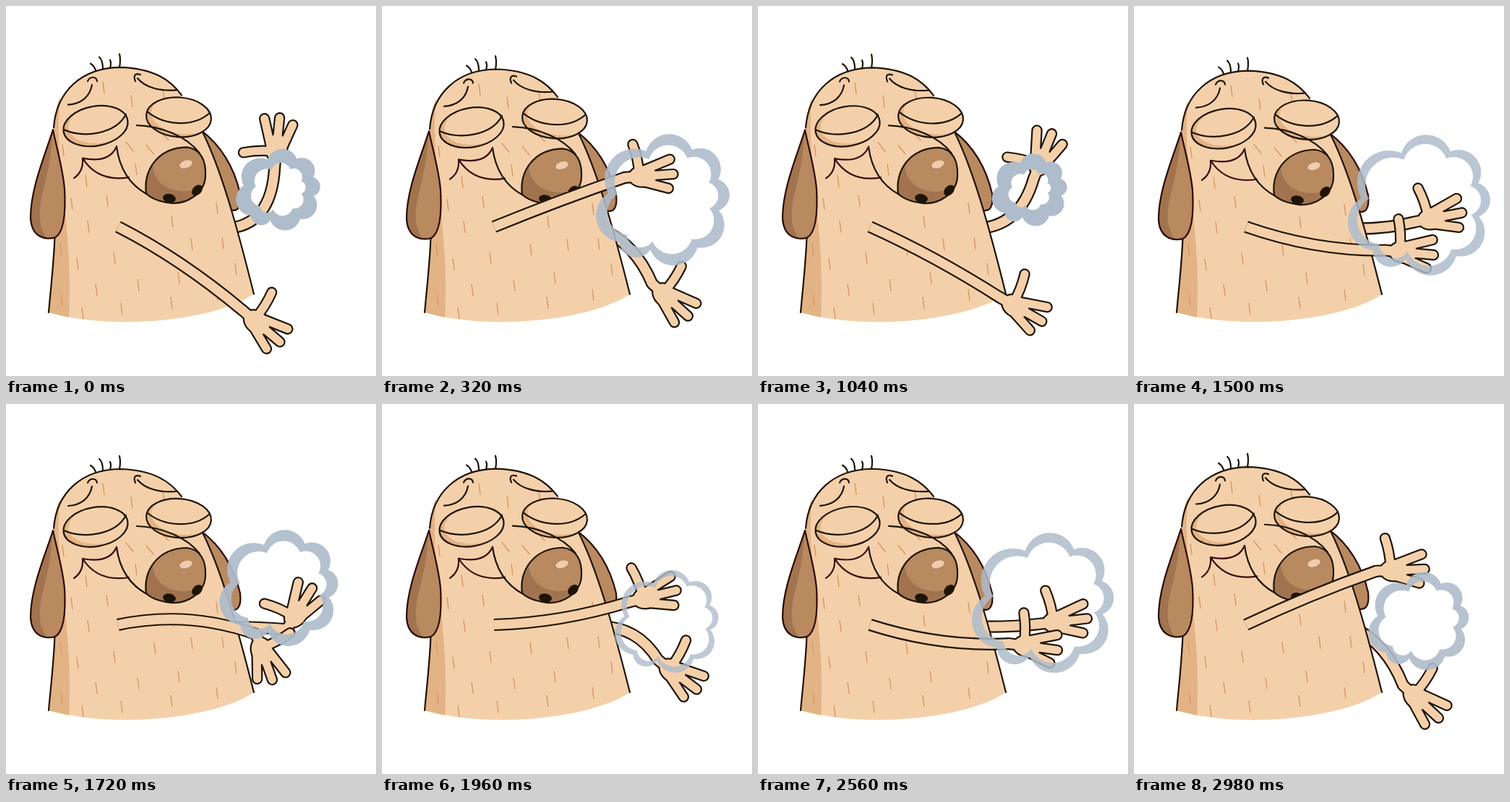
An HTML page with a canvas that plays this animation: 512x512 px, repeating every 3000 ms.

```html
<!DOCTYPE html>
<html lang="en">
<head>
<meta charset="utf-8">
<title>Clapping dog</title>
<style>
  html, body { margin: 0; width: 100%; height: 100%; overflow: hidden; background: #fff; }
  canvas { display: block; width: 512px; height: 512px; }
</style>
</head>
<body>
<canvas id="stage" width="512" height="512"></canvas>
<script>
const ctx = document.getElementById('stage').getContext('2d');
const LOOP = 3000, SWING = 1600 / 3, CYCLE = SWING * 2;
const INK = '#1e1405', SKIN = '#f4d0aa', SHADE = '#e2b384', FUR = '#b9895f',
  FUR_DARK = '#a1744f', MOUTH = '#3a0d10', FRECKLE = '#d79a68', PUFF = '#aebccb';
const RAD = Math.PI / 180;

// Front arm: time, wrist x, wrist y, bend, hand angle
const FRONT = [
  [0, 328, 421, -14, 40], [20, 326, 432, -16, 46], [45, 330, 422, -24, 62],
  [107, 346, 330, -28, 75], [190, 346, 262, -22, 48], [280, 328, 192, -14, 14],
  [313, 335, 230, -6, -2], [360, 342, 273, 13, -14], [427, 348, 331, 18, 8],
  [433, 348, 337, 18, 5], [506, 335, 402, -8, 29], [SWING, 328, 421, -14, 40]
];
// Back arm: time, wrist x, wrist y, control x, control y, hand angle
const BACK = [
  [0, 372, 222, 368, 306, -84], [20, 367, 208, 370, 306, -86], [45, 373, 238, 366, 306, -80],
  [107, 388, 303, 355, 309, -67], [190, 390, 355, 352, 310, -15], [280, 362, 412, 348, 338, 52],
  [313, 372, 390, 350, 333, 43], [360, 382, 355, 354, 308, 38], [427, 389, 305, 350, 309, -6],
  [433, 388, 300, 350, 309, -10], [506, 382, 240, 362, 306, -67], [SWING, 372, 222, 368, 306, -84]
];
// Puffs: time, centre x, centre y, radius x, radius y, hole ratio, opacity
const PUFFS = [
  [[-90, 376, 254, 18, 16, 0, 1], [-27, 376, 253.5, 53.5, 49.5, .56, 1], [0, 377, 253, 60, 56, .65, 1],
   [107, 378, 252.5, 83, 79, .77, .95], [430, 395, 273.5, 101, 97.5, .86, .85], [510, 400, 276, 105, 102, 1, .7]],
  [[443, 376, 254, 18, 16, 0, 1], [533, 377, 253, 60, 56, .65, 1],
   [640, 378, 252.5, 83, 79, .77, .95], [735, 379, 256, 93, 89, 1, .8]],
  [[735, 392, 296, 25, 22, 0, 1], [847, 394.5, 299, 71.5, 68, .8, .9],
   [893, 394.5, 299.5, 73.5, 71.5, .88, .8], [945, 395, 300, 77, 74, 1, .7]]
];
const NOTCHES = [[-.25, -.72], [.42, -.74], [.8, -.29], [.81, .18], [.5, .74], [-.19, .78], [-.64, .66], [-.8, -.08]];
const FRECKLES = [
  [135, 118], [174, 136], [218, 128], [79, 203], [91, 276], [111, 245], [140, 272], [114, 307],
  [99, 358], [125, 393], [106, 425], [76, 338], [77, 407], [160, 419], [150, 350], [183, 387],
  [206, 338], [239, 377], [229, 411], [230, 300], [257, 331], [292, 400], [300, 330], [318, 365],
  [292, 282], [180, 229], [171, 198, 5], [199, 202, 5], [219, 183, 6]
];

const SHAPES = {
  body: 'M59 424 L67 322 L66 172 C70 122 105 91 157 90 C205 91 228 108 243 128 L274 180 C297 228 318 300 343 399 C290 435 150 450 59 424Z',
  shade: 'M59 424 L67 322 L66 172 C67 155 70 142 75 130 C68 190 80 250 83 300 C88 350 89 390 87 431Z',
  outline: 'M59 424 C62 390 66 360 67.500 320 M66 172 C70 122 105 91 157 90 C205 91 228 108 243 128 M272 178 C297 228 318 300 343 399',
  ear: 'M65 175 C54 210 34 255 34 295 C35 320 52 326 68 322 C80 315 83 290 81 255 C78 225 70 200 65 175Z',
  earShade: 'M64 178 C54 210 34 255 34 295 C35 318 46 323 57 323 C38 300 50 265 56 240 C61 215 64 195 64 178Z',
  farEar: 'M270 176 C298 197 316 228 324 262 C326 280 321 288 309 284Z',
  nose: 'M194 262 C190 232 208 200 250 199 C270 201 277 218 276 238 C275 262 250 277 228 275 C212 273 200 268 194 262Z',
  noseShade: 'M194 262 C192 245 196 232 203 222 C204 252 235 268 272 254 C262 270 245 276 228 275 C212 273 200 268 194 262Z',
  muzzle: 'M181 169 C215 170 250 184 268 207 M153 198 C157 228 171 250 195 263',
  mouth: 'M94 241 C103 235 107 226 106 214 Q143 221 153 198 M106 214 Q127 247 170 240',
  brows: 'M86 141 C104 140 116 130 119 114 M113 109 C116 102 125 102 126 109 M179 109 C175 99 181 98 186 100 M182 105 C192 117 212 123 236 121',
  hair: 'M124 94 Q122 88 117 85 M134 92 Q134 80 129 76 M144 91 Q146 84 144 80 M157 90 Q159 80 157 72',
  lids: 'M80 175 C108 187 152 181 166 154 M196 151 C220 170 260 172 282 152'
};
for (const name in SHAPES) SHAPES[name] = new Path2D(SHAPES[name]);

function fill(path, color) { ctx.fillStyle = color; ctx.fill(path); }

function stroke(path, color = INK, width = 2.2) {
  ctx.strokeStyle = color;
  ctx.lineWidth = width;
  ctx.stroke(path);
}

function oval(x, y, rx, ry, turn = 0) {
  const path = new Path2D();
  path.ellipse(x, y, rx, ry, turn * RAD, 0, 2 * Math.PI);
  return path;
}

function pose(keys, t) {
  let i = 1;
  while (i < keys.length - 1 && keys[i][0] < t) i++;
  const a = keys[i - 1], b = keys[i], u = (t - a[0]) / (b[0] - a[0]);
  return a.map((v, k) => v + (b[k] - v) * u).slice(1);
}

function eye(x, y, turn) {
  const lid = oval(x, y, 45, 27, turn);
  fill(lid, SHADE);
  ctx.save();
  ctx.clip(lid);
  fill(oval(x + 8, y - 4, 46, 27, turn), SKIN);
  ctx.restore();
  stroke(lid);
}

function drawDog() {
  fill(SHAPES.body, SKIN);
  fill(SHAPES.shade, SHADE);
  const spots = new Path2D();
  for (const [x, y, lean = 1] of FRECKLES) {
    const h = lean > 1 ? 6 : 7.5;
    spots.moveTo(x - lean, y - h);
    spots.lineTo(x + lean, y + h);
  }
  stroke(spots, FRECKLE, 1.5);
  stroke(SHAPES.outline);
  stroke(SHAPES.hair);

  fill(SHAPES.ear, FUR);
  fill(SHAPES.earShade, FUR_DARK);
  stroke(SHAPES.ear, '#2b0a05');

  stroke(SHAPES.brows);
  eye(124, 170, -10);
  eye(239, 158, 4);
  stroke(SHAPES.lids);
  stroke(SHAPES.mouth, MOUTH);
  stroke(SHAPES.muzzle);

  fill(SHAPES.nose, FUR);
  fill(SHAPES.noseShade, FUR_DARK);
  fill(oval(249, 222, 9, 5, -18), '#efccae');
  fill(oval(226, 268.5, 9, 6, 10), INK);
  fill(oval(264.5, 257.5, 8.5, 6, -45), INK);
  stroke(SHAPES.nose);
}

// Ink pass first, then a narrower skin pass, so the parts share one outline.
function drawArm(x0, y0, cx, cy, x, y, angle) {
  const arm = new Path2D(`M${x0} ${y0} Q${cx} ${cy} ${x} ${y}`);
  const wrist = new Path2D(`M${x} ${y} l${10 * Math.cos(angle * RAD)} ${10 * Math.sin(angle * RAD)}`);
  const digits = new Path2D('M20 -4 Q20 -25 14 -45');
  for (const a of [-18, 0, 18]) {
    const c = Math.cos(a * RAD), s = Math.sin(a * RAD), len = a > 0 ? 62 : 67;
    digits.moveTo(26, s * 26);
    digits.lineTo(c * len, s * len);
  }
  const palm = oval(25, 0, 19, 14);
  for (const [color, grow] of [[INK, 4.4], [SKIN, 0]]) {
    ctx.lineCap = 'butt';
    stroke(arm, color, 12.8 + grow);
    ctx.lineCap = 'round';
    stroke(wrist, color, 12.8 + grow);
    ctx.save();
    ctx.translate(x, y);
    ctx.rotate(angle * RAD);
    stroke(digits, color, 11 + grow);
    fill(palm, color);
    if (grow) stroke(palm, color, grow);
    ctx.restore();
  }
}

function puffOutline(x, y, rx, ry) {
  const pts = NOTCHES.map(([u, v]) => [x + u * rx, y + v * ry]);
  let d = 'M' + pts[0];
  pts.forEach((p, i) => {
    const q = pts[(i + 1) % pts.length];
    const r = .53 * Math.hypot(q[0] - p[0], q[1] - p[1]);
    d += `A${r} ${r} 0 0 1 ${q}`;
  });
  return d + 'Z';
}

function drawPuff(keys, t) {
  const end = keys[keys.length - 1][0];
  if (t - CYCLE >= keys[0][0]) t -= CYCLE;
  if (t < keys[0][0] || t >= end) return;
  const [x, y, rx, ry, hole, alpha] = pose(keys, t);
  let d = puffOutline(x, y, rx, ry);
  if (hole > .02) d += puffOutline(x, y, rx * hole, ry * hole);
  ctx.globalAlpha = alpha;
  ctx.fillStyle = PUFF;
  ctx.fill(new Path2D(d), 'evenodd');
  ctx.globalAlpha = 1;
}

// The body stretches from its base at both ends of each swing.
function stretched(amount, draw) {
  ctx.save();
  ctx.translate(0, 425);
  ctx.scale(1, 1 + .0156 * amount);
  ctx.translate(0, -425);
  draw();
  ctx.restore();
}

function render(t) {
  const swing = t % SWING;
  const bob = Math.pow((1 + Math.cos((swing + 3) / SWING * 4 * Math.PI)) / 2, 1.5);
  ctx.fillStyle = '#fff';
  ctx.fillRect(0, 0, 512, 512);
  ctx.lineCap = ctx.lineJoin = 'round';

  stretched(bob, () => {
    fill(SHAPES.farEar, FUR);
    stroke(SHAPES.farEar, '#2b0a05');
  });
  const [bx, by, cx, cy, backAngle] = pose(BACK, swing);
  drawArm(302, 308, cx, cy, bx, by, backAngle);
  stretched(bob, drawDog);
  const [fx, fy, bend, frontAngle] = pose(FRONT, swing);
  drawArm(155, 305.5, (155 + fx) / 2, (305.5 + fy) / 2 + bend, fx, fy, frontAngle);
  for (const keys of PUFFS) drawPuff(keys, t % CYCLE);
}

const start = performance.now();
function tick() {
  render((performance.now() - start) % LOOP);
  requestAnimationFrame(tick);
}
tick();
</script>
</body>
</html>
```
